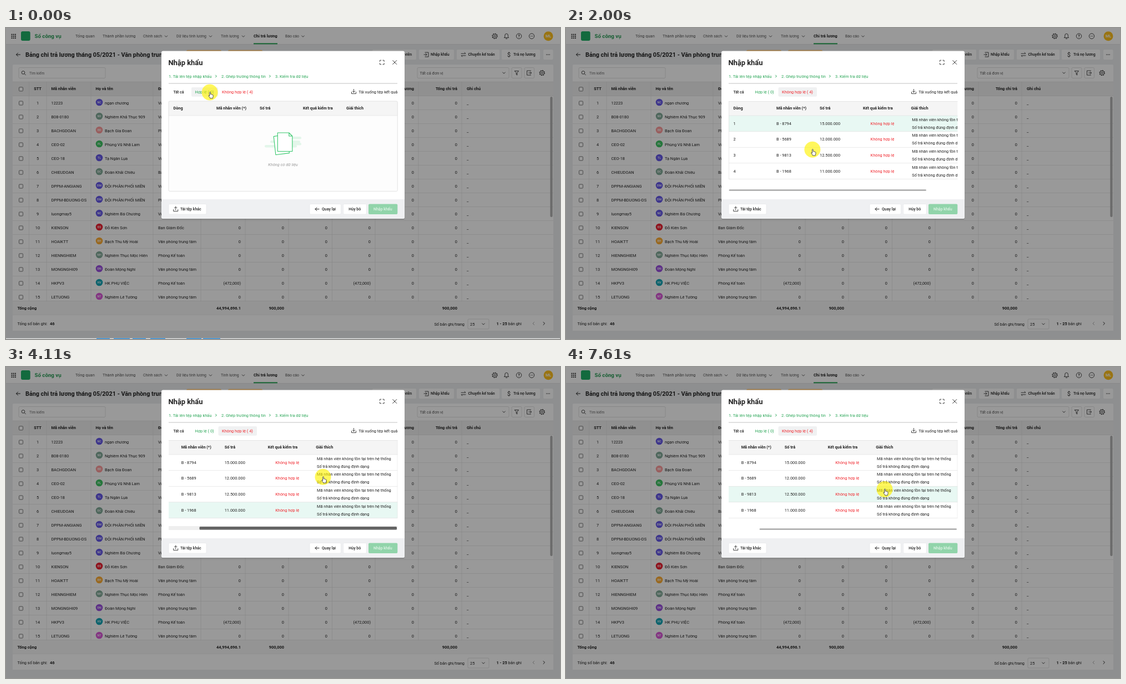
Recreate the animation shown at these times as an HTML page. Size 998 by 561 pixels, loop 8 s.

```html
<!DOCTYPE html>
<html lang="vi">
<head>
<meta charset="utf-8">
<style>
  html, body { margin: 0; width: 100%; height: 100%; overflow: hidden; background: #949494; }
  svg { display: block; }
  text { font-family: Roboto, "Noto Sans", sans-serif; white-space: pre; }
</style>
</head>
<body>
<svg id="stage" xmlns="http://www.w3.org/2000/svg" width="998" height="561" viewBox="0 0 998 561"></svg>
<script>
const GREEN = '#27a555', RED = '#f0262d', INK = '#212121', LINE = '#dcdcdc';

// Text is placed by its vertical middle.
const text = (x, y, str, o = {}) => {
  const size = o.size || 7.4;
  return `<text x="${x}" y="${y + size * 0.355}" font-size="${size}" font-weight="${o.weight || 400}"` +
    ` fill="${o.fill || INK}" text-anchor="${o.anchor || 'start'}" ${o.extra || ''}>${str}</text>`;
};
const bold = (x, y, str, o = {}) => text(x, y, str, { weight: 700, ...o });
const right = (x, y, str, o = {}) => text(x, y, str, { anchor: 'end', ...o });
const rect = (x, y, x2, y2, fill, extra = '') =>
  `<rect x="${x}" y="${y}" width="${x2 - x}" height="${y2 - y}" fill="${fill}" ${extra}/>`;
const box = (x, y, x2, y2, stroke = 'none', r = 2) =>
  rect(x, y, x2, y2, '#fff', `rx="${r}" stroke="${stroke}" stroke-width=".6"`);
const path = (d, stroke = '#333', w = 0.9, fill = 'none') =>
  `<path d="${d}" fill="${fill}" stroke="${stroke}" stroke-width="${w}" stroke-linecap="round" stroke-linejoin="round"/>`;
const circle = (x, y, r, fill, extra = '') => `<circle cx="${x}" cy="${y}" r="${r}" fill="${fill}" ${extra}/>`;
const ring = (x, y, r, w = 0.9) => circle(x, y, r, 'none', `stroke="#333" stroke-width="${w}"`);
const hline = (x, x2, y, c = LINE) => rect(x, y - 0.3, x2, y + 0.3, c);
const vline = (x, y, y2, c = LINE) => rect(x - 0.3, y, x + 0.3, y2, c);
const down = (x, y, c) => path(`M${x - 2.3} ${y - 1.1}l2.3 2.3 2.3-2.3`, c);
const next = (x, y, c, dir = 1, h = 2.5) => path(`M${x - dir} ${y - h}l${h * dir} ${h} ${-h * dir} ${h}`, c, 1);
const gear = (x, y) => ring(x, y, 1.6) + ring(x, y, 3.9) +
  circle(x, y, 4.7, 'none', 'stroke="#333" stroke-width="1.1" stroke-dasharray="1.7 1.99"');
const back = (x, y, w = 7) => path(`M${x + w / 2} ${y}h${-w}m3-3l-3 3 3 3`, '#222', 1);
const tray = (x, y, dir) => path(`M${x - 4} ${y + 1}v3h8v-3M${x} ${y + 1.6}v-5.6` +
  (dir > 0 ? 'm-2.3 3.3l2.3 2.3 2.3-2.3' : 'm-2.3 2.2l2.3-2.3 2.3 2.3'));
const exportIcon = (x, y) => path(`M${x + 3} ${y - 4}h-7v8h7M${x - 1} ${y}h5m-2-2l2 2-2 2`);

const VP = 'Văn phòng trung tâm', KT = 'Phòng Kế toán', BG = 'Ban Giám Đốc';
const people = [
  ['12223', 'NC', 'ngạn chương', VP, '#6558e8'],
  ['B08-0180', 'N9', 'Nghiêm Khả Thục 909', VP, '#82ab99'],
  ['BACHGDOAN', 'BĐ', 'Bạch Gia Đoan', KT, '#ff9d9d'],
  ['CEO-02', 'PL', 'Phùng Vũ Nhã Lam', VP, '#3fc463'],
  ['CEO-18', 'TL', 'Tạ Ngân Lụa', VP, '#6558e8'],
  ['CHIEUDOAN', 'ĐC', 'Đoàn Khải Chiêu', BG, '#82ab99'],
  ['DPPM-ANGIANG', 'ĐM', 'ĐỘI PHÂN PHỐI MIỀN', VP, '#6558e8'],
  ['DPPM-BDUONG-DS', 'ĐM', 'ĐỘI PHÂN PHỐI MIỀN', KT, '#6558e8'],
  ['luongmay5', 'NC', 'Nghiêm Bá Chương', VP, '#6558e8'],
  ['KIENSON', 'ĐS', 'Đỗ Kiên Sơn', BG, '#ee2030'],
  ['HOAIKTT', 'BH', 'Bạch Thu Mỹ Hoài', VP, '#ffad33'],
  ['HIENNGHIEM', 'NH', 'Nghiêm Thục Mộc Hiên', KT, '#82ab99'],
  ['MONGNGHI09', 'ĐN', 'Đoàn Mộng Nghi', VP, '#9a50e0'],
  ['HKPV3', 'HV', 'HK PHỤ VIỆC', KT, '#12a5b5'],
  ['LETUONG', 'NT', 'Nghiêm Lê Tường', VP, '#d958d8'],
];

function topBar() {
  let s = rect(0, 0, 998, 29.5, '#fff') + hline(0, 998, 29.5, '#d5d6d8');
  for (let i = 0; i < 9; i++) s += rect(9.5 + i % 3 * 3.2, 10.7 + (i / 3 | 0) * 3.2, 11.5 + i % 3 * 3.2, 12.7 + (i / 3 | 0) * 3.2, '#333');
  s += rect(27, 6, 43.7, 23, '#20b067', 'rx="3"');
  s += bold(51.5, 14.5, 'Sổ công vụ', { size: 9.7, fill: '#249a52' });
  s += text(125, 14.7, 'Tổng quan', { fill: '#555' }) + text(174, 14.7, 'Thành phần lương', { fill: '#555' });
  [[247, 'Chính sách', 288.5], [307, 'Dữ liệu tính lương', 368.5], [387, 'Tính lương', 427.5], [503, 'Báo cáo', 535]]
    .forEach(([x, str, c]) => s += text(x, 15, str, { size: 6.9, fill: '#555' }) + down(c, 15, '#444'));
  s += bold(446, 14.7, 'Chi trả lương') + rect(446, 27.3, 489, 29.3, GREEN);
  s += gear(880.5, 14.7) + path('M897.6 17.5h8l-1.2-1.8v-2.6a2.8 2.8 0 0 0-5.6 0v2.6zM900.5 19.3h2.2');
  s += ring(924, 14.7, 4.7) + bold(924, 14.8, '?', { size: 6.5, anchor: 'middle' }) + ring(947, 14.7, 4.7);
  [-2, 0, 2].forEach(d => s += circle(947 + d, 14.7, 0.6, '#333'));
  return s + circle(977, 14.7, 8.5, '#ffc01e') + bold(977, 14.8, 'ML', { size: 7, fill: '#fff', anchor: 'middle' });
}

function titleBar() {
  let s = back(22, 48) + bold(35, 48, 'Bảng chi trả lương tháng 05/2021 - Văn phòng trung tâm', { size: 10.8 });
  s += rect(325, 39.8, 388, 56, '#ffc069', 'rx="2"') + rect(400, 39.8, 462, 56, '#ffc069', 'rx="2"');
  [[660, 739], [744, 807], [812, 889], [893, 962], [968, 985.5]].forEach(([a, b]) => s += box(a, 39, b, 57));
  s += bold(731, 48, 'viên', { size: 6.8, weight: 500, anchor: 'end' });
  [[765, 'Nhập khẩu'], [832.5, 'Chuyển kế toán'], [914, 'Trả nợ lương']]
    .forEach(([x, str]) => s += text(x, 48, str, { size: 7, weight: 500 }));
  s += path('M755 44h6v8h-6M753 48h5m-2-2l2 2-2 2') + path('M820 46.2h8l-2-2m2 5.6h-8l2 2') + text(906, 48, '$', { size: 10.5, anchor: 'middle' });
  [-2.6, 0, 2.6].forEach(d => s += circle(976.5 + d, 48, 0.8, '#333'));
  return s;
}

function toolBar() {
  let s = rect(12, 66, 986, 546, '#fff', 'rx="2"');
  s += box(23, 71.5, 179, 90.5, '#ccc') + ring(31, 80.4, 2.8) + path('M33.2 82.6l2.2 2.2') + text(42, 81.3, 'Tìm kiếm', { size: 6.6, fill: '#666' });
  s += box(741, 71.5, 906, 90.5, '#ccc') + text(745.5, 81, 'Tất cả đơn vị', { fill: '#555' }) + down(897, 81);
  s += box(911, 71.5, 929, 90.5, '#ccc') + path('M916.5 77.5h7l-2.7 3.5v4l-1.6-1.2v-2.8z');
  return s + box(934, 71.5, 951.5, 90.5, '#ccc') + exportIcon(942.5, 81) + gear(965.7, 81);
}

function mainTable() {
  const cols = [41.5, 73, 153, 265, 351, 431, 509, 587.5, 665, 743, 821];
  const check = y => rect(23.5, y - 3.5, 30.5, y + 3.5, '#fff', 'rx="1.2" stroke="#555" stroke-width=".8"');
  let s = rect(12, 97, 986, 122.5, '#efefef') + check(110.3);
  s += bold(57, 109.5, 'STT', { anchor: 'middle' });
  [[81.5, 'Mã nhân viên'], [161.5, 'Họ và tên'], [274, 'Đơn vị'], [830, 'Ghi chú']].forEach(([x, str]) => s += bold(x, 109.5, str));
  s += bold(735, 109.5, 'Trả lương', { anchor: 'end' }) + bold(813, 109.5, 'Tổng chi trả', { anchor: 'end' });
  people.forEach(([code, mark, name, unit, color], i) => {
    const y = 135 + i * 25, money = i === 13 ? '(472,000)' : '0';
    s += hline(12, 986, y + 12.4) + check(y + 0.5) + text(57, y, i + 1, { anchor: 'middle' }) + text(81.5, y, code);
    s += circle(168, y - 1, 6.3, color) + text(168, y - 0.8, mark, { size: 5.2, weight: 500, fill: '#fff', anchor: 'middle' });
    s += text(178, y, name) + text(274, y, unit);
    [money, '0', '0', money, '0', '0'].forEach((v, k) => s += right(423 + k * 78, y, v));
    s += text(830, y, '_');
  });
  s += hline(12, 986, 97) + hline(12, 986, 122.5);
  cols.forEach(x => s += vline(x, 97, 492.5));
  s += rect(980.3, 124, 984.6, 341, '#b2b2b2', 'rx="2"');
  s += rect(12, 492.5, 986, 518, '#f6f6f6') + hline(12, 986, 492.5) + hline(12, 986, 518);
  s += bold(20.5, 505.3, 'Tổng cộng');
  [[423, '44,994,696.1'], [501, '900,000'], [813, '900,000']].forEach(([x, str]) => s += bold(x, 505.3, str, { anchor: 'end' }));
  s += rect(12, 518.3, 986, 546, '#fff') + text(20.5, 533.5, 'Tổng số bản ghi:') + bold(79, 533.5, '46');
  s += right(826, 534, 'Số bản ghi/trang') + box(832, 525, 870, 543, '#ccc') + text(836, 534, '25') + down(860, 534);
  s += text(883.5, 533.5, '<tspan font-weight="700">1 - 25</tspan> bản ghi');
  return s + next(950.5, 533, '#aaa', -1) + next(969, 533, '#222');
}

function dialog() {
  let s = '<rect x="280" y="43" width="438" height="303" rx="3" fill="#000" opacity=".12"/>' + box(280, 41.5, 718, 344, 'none', 3);
  s += bold(292.5, 62, 'Nhập khẩu', { size: 12.9 });
  s += path('M673.5 60.5v-2.3h2.3m3 0h2.3v2.3m0 3v2.3h-2.3m-3 0h-2.3v-2.3') + path('M696.7 58.5l7 7m0-7l-7 7', '#333', 1);
  [[293, '1. Tải lên tệp nhập khẩu'], [388, '2. Ghép trường thông tin'], [485, '3. Kiểm tra dữ liệu']]
    .forEach(([x, str]) => s += text(x, 87.7, str, { fill: GREEN }));
  s += next(378.5, 87, GREEN, 1, 1.9) + next(475.5, 87, GREEN, 1, 1.9) + hline(293, 705, 100, '#999');
  s += '<rect id="tab" y="107" height="16.7" rx="2" fill="#f0f1f2"/>';
  s += text(301.5, 115.5, 'Tất cả', { size: 7, weight: 500 });
  s += text(340.5, 115, 'Hợp lệ ( 0)', { fill: GREEN }) + text(389, 115, 'Không hợp lệ ( 4)', { fill: RED });
  s += tray(626.5, 114.5, 1) + right(705.3, 115, 'Tải xuống tệp kết quả');
  s += '<path d="M280 309h438v32a3 3 0 0 1-3 3h-432a3 3 0 0 1-3-3z" fill="#eff0f2"/>';
  [[293, 361], [547, 603.5], [607.5, 649.5]].forEach(([a, b]) => s += box(a, 317.5, b, 336, '#e3e4e6'));
  s += rect(653, 317.5, 705.3, 336, '#91d4aa', 'rx="2"');
  s += tray(305.7, 326.5, -1) + back(560.5, 326.7);
  [[314, 'Tải tệp khác'], [569, 'Quay lại'], [617.3, 'Hủy bỏ'], [662, 'Nhập khẩu', '#e2f5e9']]
    .forEach(([x, str, fill]) => s += text(x, 327, str, { size: 7, weight: 500, fill }));
  return s;
}

const ROW_TOP = 158, ROW_H = 28.6;
const heads = lastX => [[301.5, 'Dòng'], [379, 'Mã nhân viên (*)'], [457, 'Số trả'], [535, 'Kết quả kiểm tra'], [lastX, 'Giải thích']]
  .map(([x, str]) => bold(x, 144.7, str, { size: 7.3 })).join('');

function emptyTable() {
  let s = rect(293, 132, 705.3, 294.5, '#fdfdfd', 'rx="2"') + rect(293, 132, 705.3, 158, '#f5f5f5') + heads(613);
  s += hline(293, 705, 158) + rect(293, 132, 705.3, 294.5, 'none', `rx="2" stroke="${LINE}" stroke-width=".8"`);
  [[486, 532, 196], [476, 530, 203], [466, 524, 211], [488, 532, 207]]
    .forEach(([a, b, y]) => s += rect(a, y, b, y + 4.5, '#e3f6ea', 'rx="2.2"'));
  s += path('M489 194.5l-6.8 1.1 3.7 33.2 24.5-3.2-.4-3.2', '#35c76b', 1.1, '#fff');
  s += path('M489.3 189h20.5l6 6v27.5h-26.5zM509.8 189v6h6', '#35c76b', 1.1, '#fff');
  return s + text(499, 246.5, 'Không có dữ liệu', { fill: '#999', anchor: 'middle', extra: 'font-style="italic"' });
}

function dataTable() {
  let rows = heads(621.5);
  [['8794', '15'], ['5689', '12'], ['9813', '12.5'], ['1968', '11']].forEach(([code, sum], i) => {
    const y = 172.2 + i * ROW_H, [whole, half] = sum.split('.');
    rows += text(301.5, y, i + 1) + text(379, y, 'B - ' + code) + text(457, y, `${whole}.${half ? '500' : '000'}.000`);
    rows += text(570, y, 'Không hợp lệ', { fill: RED, anchor: 'middle' });
    rows += text(623.3, y - 7, 'Mã nhân viên không tồn tại trên hệ thống') + text(623.3, y + 7, 'Số trả không đúng định dạng');
    rows += hline(293, 769, ROW_TOP + (i + 1) * ROW_H);
  });
  rows += hline(293, 769, 132.3) + hline(293, 769, 158) + vline(293.3, 132, 272.5) + vline(768.4, 132, 272.5);
  return rect(293, 132, 705.3, 158, '#f5f5f5') +
    `<rect id="hover" x="293" width="412.3" height="${ROW_H}" fill="#e8f8f3"/>` +
    `<g clip-path="url(#view)"><g id="scroll">${rows}</g></g>` +
    rect(293, 287, 705.3, 294, '#eee', 'id="rail"') + '<rect id="thumb" width="355.5" rx="1.5"/>';
}

const strip = rect(0, 559.7, 998, 561, '#e4e4e4') +
  [[163, 187], [194, 223], [228, 252], [260, 287], [325, 352], [355, 386]].map(([a, b]) => rect(a, 559.7, b, 561, '#2b8fe0')).join('');

const hand = path('M-.4 6.2V.4c0-1.3 1.8-1.3 1.8 0v3.3c.5-.5 1.4-.4 1.6.3.5-.4 1.3-.2 1.5.5.7-.4 1.5 0 1.5.9v2.4c0 1-.7 1.6-.7 3H.6c-.1-1.3-1.9-2.5-2.6-4.2-.4-1 .6-1.6 1.6-.4z', '#111', 0.7, '#fff');
const arrow = path('M0 0v7.6l1.8-1.7 1.3 3 1.3-.6-1.3-2.8h2.5z', '#111', 0.6, '#fff');

const stage = document.getElementById('stage');
stage.innerHTML = '<defs><clipPath id="view"><rect x="293" y="132" width="412.5" height="141"/></clipPath></defs>' +
  rect(0, 0, 998, 561, '#eceef0') + topBar() + titleBar() + toolBar() + mainTable() +
  rect(0, 0, 998, 561, '#000', 'opacity=".4"') + `<g id="strip">${strip}</g>` + dialog() +
  `<g id="empty">${emptyTable()}</g><g id="data">${dataTable()}</g>` +
  `<g id="pointer">${circle(0, 0, 14.5, '#fff200', 'opacity=".64"')}<g id="hand">${hand}</g><g id="arrow">${arrow}</g></g>`;

const LOOP = 8000;
const track = [
  [0, 367, 116], [380, 404.5, 114], [1690, 404.5, 114], [1730, 410, 126], [2050, 450, 236], [2380, 473, 293],
  [3200, 473, 293], [3850, 532, 293], [3950, 550, 278], [4010, 558, 256], [4070, 567, 212], [4110, 571, 198.5],
  [4330, 572, 155], [4690, 573, 170.5], [6720, 573, 170.5], [6760, 573, 176], [7000, 573, 199],
  [7340, 573, 199], [7380, 573, 203], [7480, 573.5, 217], [7610, 574, 220.5],
];
const scrollKeys = [[3200, 0], [3800, 63.3]];
const barKeys = [[2580, 0], [2760, 1], [4150, 1], [4350, 0]];
const railKeys = [[3200, 0], [3300, 1], [4150, 1], [4350, 0]];
const HOVER_LAG = 100;

// Linear value of column c in a key table at time t.
function at(keys, t, c = 1) {
  const i = keys.findIndex(k => k[0] > t);
  if (i === 0) return keys[0][c];
  if (i < 0) return keys[keys.length - 1][c];
  const a = keys[i - 1], b = keys[i];
  return a[c] + (b[c] - a[c]) * (t - a[0]) / (b[0] - a[0]);
}

const el = {};
stage.querySelectorAll('[id]').forEach(n => el[n.id] = n);
const set = (n, props) => { for (const k in props) n.setAttribute(k, props[k]); };
const show = (n, on) => n.setAttribute('display', on ? 'inline' : 'none');

function draw(t) {
  const x = at(track, t), y = at(track, t, 2);
  const moved = at(scrollKeys, t), bar = at(barKeys, t), rail = at(railKeys, t);
  const row = Math.floor((at(track, t - HOVER_LAG, 2) - ROW_TOP) / ROW_H);
  const shade = Math.round(150 - 38 * bar - 12 * rail);
  const onTab = t < 660;

  show(el.strip, t < 570);
  show(el.empty, t < 1000);
  show(el.data, t >= 1000);
  set(el.tab, onTab ? { x: 334, width: 48 } : { x: 382.5, width: 69.5 });
  show(el.hover, row >= 0 && row < 4);
  set(el.hover, { y: ROW_TOP + row * ROW_H });
  set(el.scroll, { transform: `translate(${-moved} 0)` });
  set(el.rail, { opacity: rail });
  set(el.thumb, { x: 293.5 + moved * 55 / 63.3, y: 291.4 - 3.4 * bar, height: 2.2 + 3.4 * bar, fill: `rgb(${shade},${shade},${shade})` });

  const overText = y < 132 || (y > ROW_TOP - 6 && y < 272);
  set(el.pointer, { transform: `translate(${x} ${y})` });
  show(el.hand, overText);
  show(el.arrow, !overText);
}

const start = performance.now();
function tick() {
  draw((performance.now() - start) % LOOP);
  requestAnimationFrame(tick);
}
tick();
</script>
</body>
</html>
```
